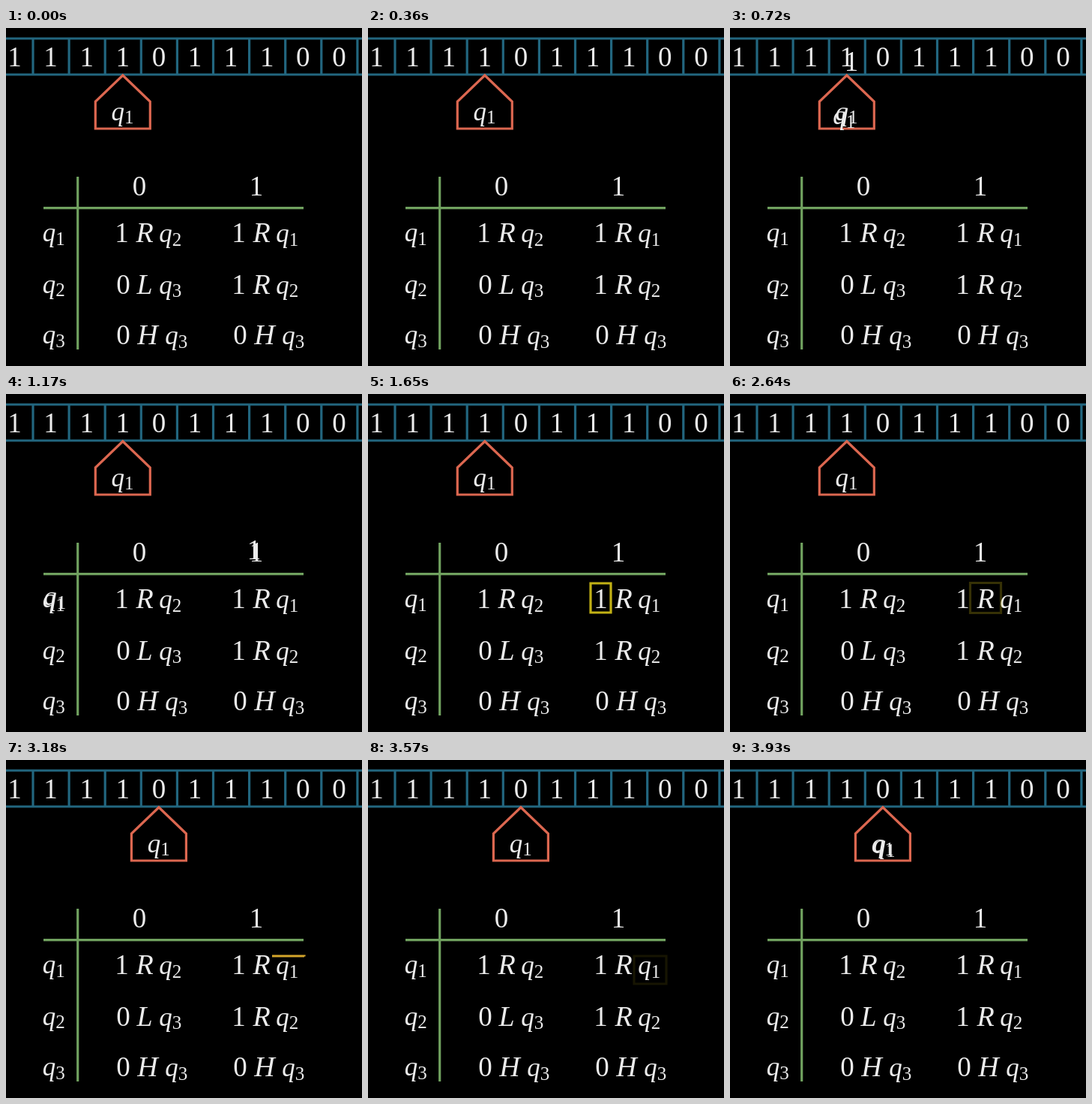
An HTML page with a canvas for the animation above (3960 ms loop, 475 px wide and 450 px high).

```html
<!DOCTYPE html>
<html lang="en">
<head>
<meta charset="utf-8">
<title>Turing machine step</title>
<style>
  html, body { margin: 0; width: 100%; height: 100%; background: #000; overflow: hidden; }
  canvas { display: block; }
</style>
</head>
<body>
<canvas width="475" height="450"></canvas>
<script>
const ctx = document.querySelector('canvas').getContext('2d');
const LOOP = 3960, FLASH = 298, MOVE = 302, CELL = 48.1, TAPE = '1111011100';
const DIGIT = 37, CAPITAL = 38, STATE = 35, SUB = 25;
const SERIF = '"Liberation Serif", "Times New Roman", serif';
const cellX = i => 11.5 + i * CELL;

// Sigmoid ease over a time window, clamped to 0..1
const sigmoid = x => 1 / (1 + Math.exp(-x));
const smooth = u => (sigmoid(10 * (u - 0.5)) - sigmoid(-5)) / (sigmoid(5) - sigmoid(-5));
const ease = (t, start, length) => smooth(Math.min(1, Math.max(0, (t - start) / length)));
const mix = (a, b, k) => a + (b - a) * k;

function line(points, color, closed) {
  ctx.beginPath();
  points.forEach(([x, y]) => ctx.lineTo(x, y));
  if (closed) ctx.closePath();
  ctx.strokeStyle = color;
  ctx.lineWidth = 3.2;
  ctx.stroke();
}

function glyph(s, x, y, size = DIGIT, style = '') {
  ctx.font = `${style} ${size}px ${SERIF}`;
  ctx.fillText(s, x, y);
}

function state(n, x, y) {
  glyph('q', x, y, STATE, 'italic');
  glyph(n, x + 15, y + 4.5, SUB);
}

function rule([symbol, move, next], x, y) {
  const wide = move === 'H';
  glyph(symbol, x + (symbol === '0' ? 2 : 0), y);
  glyph(move, x + (wide ? 34.5 : 30.5), y, CAPITAL, 'italic');
  state(next, x + (wide ? 66.5 : 58.5), y);
}

function drawTape() {
  const blue = '#22667f';
  for (const y of [14, 62]) line([[0, y], [475, y]], blue);
  for (let i = 0; i < 10; i++) {
    const x = 36 + i * CELL;
    line([[x, 14], [x, 62]], blue);
    glyph(TAPE[i], cellX(i), 51);
  }
}

function drawTable() {
  const green = '#70a15f';
  line([[95.7, 198], [95.7, 428]], green);
  line([[50, 239.7], [397, 239.7]], green);
  glyph('0', 178, 223);
  glyph('1', 334, 223);
  [['1R2', '1R1'], ['0L3', '1R2'], ['0H3', '0H3']].forEach((row, i) => {
    const y = [285, 353.5, 421][i];
    state(i + 1, 57.5, y - 1);
    row.forEach((text, j) => rule(text, 154.5 + j * 156, y));
  });
}

function drawHead(x) {
  line([[x, 63], [x + 36.5, 98], [x + 36.5, 134], [x - 36.5, 134], [x - 36.5, 98]], '#dc6750', true);
  state(1, x - 6.5, 122.5);
}

// A box traced clockwise from its top left corner, then faded out
function flash(t, start, x, y, w, h) {
  if (t < start || t > start + 2 * FLASH) return;
  const drawn = ease(t, start, FLASH), size = 2 * (w + h);
  ctx.save();
  ctx.globalAlpha = 1 - ease(t, start + FLASH, FLASH);
  ctx.setLineDash(drawn < 1 ? [drawn * size, size] : []);
  const color = `rgb(${mix(208, 224, drawn)},${mix(150, 205, drawn)},${mix(48, 25, drawn)})`;
  line([[x, y], [x + w, y], [x + w, y + h], [x, y + h]], color, true);
  ctx.restore();
}

// Draws a moving copy while its time window is open
function fly(t, start, length, from, to, draw) {
  if (t < start || t > start + length) return;
  const k = ease(t, start, length);
  draw(mix(from[0], to[0], k), mix(from[1], to[1], k));
}

function draw(t) {
  const one = (x, y) => glyph('1', x, y), q1 = (x, y) => state(1, x, y);
  ctx.fillStyle = '#000';
  ctx.fillRect(0, 0, 475, 450);
  ctx.fillStyle = '#ececec';
  ctx.textAlign = 'center';

  drawTape();
  drawTable();
  drawHead(mix(cellX(3), cellX(4), ease(t, 2756, MOVE)));

  // Look up the rule
  fly(t, 600, 655, [cellX(3), 51], [334, 223], one);
  fly(t, 600, 655, [cellX(3) - 6.5, 122.5], [57.5, 284], q1);
  // Write the symbol, move the head, change the state
  flash(t, 1259, 297, 252, 27, 39);
  fly(t, 1855, MOVE, [310.5, 285], [cellX(3), 51], one);
  flash(t, 2160, 320.5, 251.5, 41, 40);
  flash(t, 3061, 355, 261, 43, 37);
  fly(t, 3657, MOVE, [369, 285], [cellX(4) - 6.5, 122.5], q1);
}

const begin = performance.now();
function frame() {
  draw((performance.now() - begin) % LOOP);
  requestAnimationFrame(frame);
}
frame();
</script>
</body>
</html>
```
